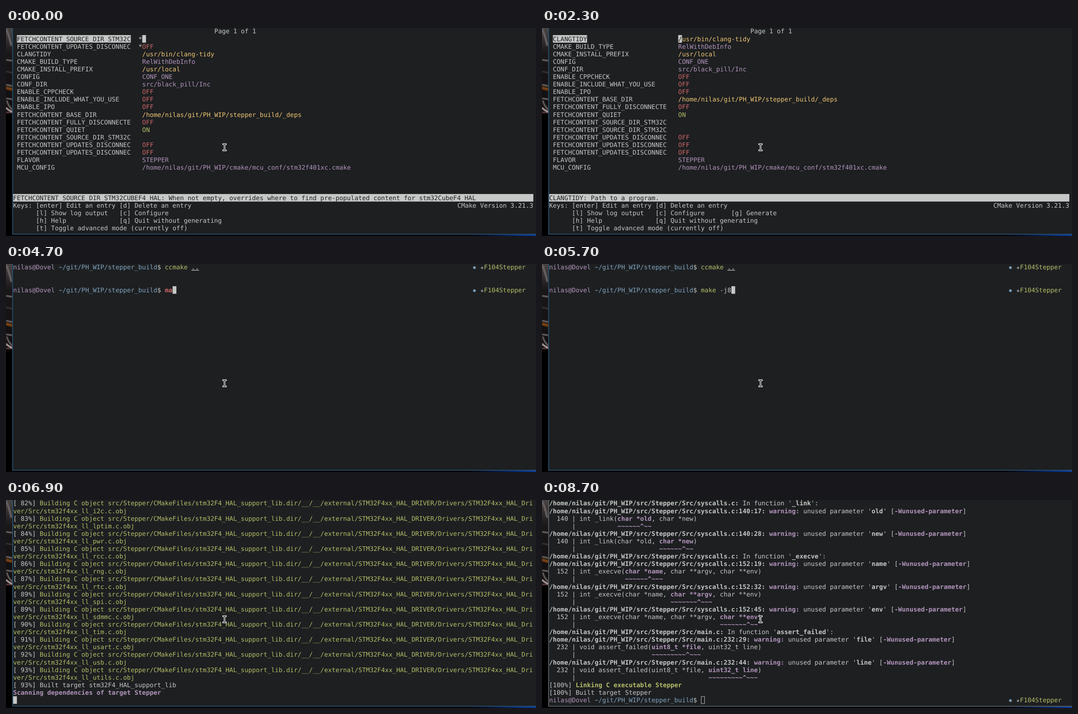
An HTML page that plays this animation: 1192 px wide and 470 px high, repeating every 9300 ms.

```html
<!DOCTYPE html>
<html lang="en">
<head>
<meta charset="utf-8">
<title>Terminal build</title>
<style>
html, body { margin: 0; width: 100%; height: 100%; overflow: hidden; background: #000; }
svg { display: block; width: 100%; height: 100%; }
text { font: 14.185px "DejaVu Sans Mono", monospace; white-space: pre; fill: #c5c8c6; text-rendering: geometricPrecision; }
.r, .R { fill: #cc6666; }
.g, .G { fill: #b5bd68; }
.y { fill: #f0c674; }
.p, .P { fill: #b294bb; }
.b, .S { fill: #81a2be; }
.k { fill: #1d1f21; }
.u { text-decoration: underline; }
.B, .P, .G, .R, .S { font-weight: bold; }
</style>
</head>
<body>
<svg viewBox="0 0 1192 470">
  <defs>
    <linearGradient id="glow">
      <stop offset="0" stop-color="#000"/>
      <stop offset="1" stop-color="#0a3c9e"/>
    </linearGradient>
    <linearGradient id="dusk" x2="0" y2="1">
      <stop offset="0" stop-color="#4a4445"/>
      <stop offset=".3" stop-color="#1a1718"/>
      <stop offset="1" stop-color="#120e0f"/>
    </linearGradient>
    <filter id="soft" x="-20%" y="-20%" width="140%" height="140%"><feGaussianBlur stdDeviation="0.8"/></filter>
    <clipPath id="strip"><rect width="14" height="193"/></clipPath>
    <path id="beam" d="M488.500 262.500H490.500L491.500 263.500L492.500 262.500H494.500M491.500 263.500V275.500M488.500 276.500H490.500L491.500 275.500L492.500 276.500H494.500" fill="none" stroke-linecap="square"/>
  </defs>
  <rect width="1192" height="470"/>
  <g clip-path="url(#strip)">
    <rect width="14" height="193" fill="url(#dusk)"/>
    <g filter="url(#soft)" fill="none" stroke="#a39c9d" stroke-width="2">
      <path d="M0 2Q7 16 12 40" stroke="#6d6667" stroke-width="4"/>
      <path d="M0 72L14 74"/>
      <path d="M0 98L14 101" stroke="#4d4748"/>
      <path d="M0 128L14 131"/>
      <path d="M0 135L14 139" stroke="#7a430f" stroke-width="6"/>
      <path d="M0 159L14 161"/>
      <path d="M2 164Q5 177 14 184"/>
      <path d="M0 180Q5 186 14 189" stroke="#d8c4c4" stroke-width="3"/>
      <path d="M0 191H14" stroke="#8a5557" stroke-width="2"/>
    </g>
  </g>
  <rect x="1040" y="467" width="152" height="3" fill="url(#glow)"/>
  <rect id="frame" x="14" width="1178" height="467"/>
  <rect x="15.7" width="1176.3" height="465.3" fill="#1d1f21"/>
  <g id="screen"></g>
  <use href="#beam" stroke="#fff" stroke-width="3.4"/>
  <use href="#beam" stroke="#000" stroke-width="1.1"/>
</svg>
<script>
const LOOP = 9300, CW = 8.54, RH = 17.1, LEFT = 16, TOP = -1.1, COLS = 137, LAST = 26;
const screen = document.getElementById("screen");
const frame = document.getElementById("frame");
const USER = "nilas", HOST = "Dovel", HOME = `/home/${USER}/git/PH_WIP`;

const x = col => (LEFT + col * CW).toFixed(2);
const y = row => (TOP + row * RH).toFixed(2);

// Inline markup: {c:text} sets class c.
const style = s => s.replace(/\{(\w):([^}]*)\}/g, '<tspan class="$1">$2</tspan>');
const put = (row, col, s) => `<text x="${x(col)}" y="${(TOP + row * RH + 13.5).toFixed(2)}">${style(s)}</text>`;
const bar = (row, col, n) => `<rect x="${x(col)}" y="${y(row)}" width="${(n * CW).toFixed(2)}" height="${RH}" fill="#c5c8c6"/>`;
const cursor = (row, col) => bar(row, col, 1);
const hollow = (row, col) =>
  `<rect x="${+x(col) + .5}" y="${+y(row) + .5}" width="${CW - 1}" height="${RH - 1}" fill="none" stroke="#c5c8c6"/>`;
const version = row => put(row, 117, "CMake Version 3.21.3");

// ---- ccmake pages ----
const SOURCE = "FETCHCONTENT_SOURCE_DIR_STM32C", UPDATES = "FETCHCONTENT_UPDATES_DISCONNEC";
const OFF = "{r:OFF}";
const head = [
  ["CLANGTIDY", "{y:/usr/bin/clang-tidy}"],
  ["CMAKE_BUILD_TYPE", "{p:RelWithDebInfo}"],
  ["CMAKE_INSTALL_PREFIX", "{y:/usr/local}"],
  ["CONFIG", "{p:CONF_ONE}"],
  ["CONF_DIR", "{p:src/black_pill/Inc}"],
  ["ENABLE_CPPCHECK", OFF],
  ["ENABLE_INCLUDE_WHAT_YOU_USE", OFF],
  ["ENABLE_IPO", OFF],
  ["FETCHCONTENT_BASE_DIR", `{y:${HOME}/stepper_build/_deps}`],
  ["FETCHCONTENT_FULLY_DISCONNECTE", OFF],
  ["FETCHCONTENT_QUIET", "{g:ON}"],
  [SOURCE, ""]
];
const tail = [
  [UPDATES, OFF],
  [UPDATES, OFF],
  ["FLAVOR", "{p:STEPPER}"],
  ["MCU_CONFIG", `{p:${HOME}/cmake/mcu_conf/stm32f401xc.cmake}`]
];
const before = [[SOURCE, "", "*"], [UPDATES, OFF, "*"], ...head, ...tail];
const after = [...head, [SOURCE, ""], [UPDATES, OFF], ...tail];

function page(entries, help, generate) {
  let out = put(0, 53, "Page 1 of 1") + bar(1, 1, entries[0][0].length) + cursor(1, 34);
  entries.forEach(([name, value, mark], i) => {
    const first = i === 0;
    out += put(i + 1, 1, first ? `{k:${name}}` : name);
    if (mark) out += put(i + 1, 33, mark);
    out += put(i + 1, 34, value);
    if (first && value) out += put(1, 34, "{k:/}");
  });
  return out + bar(22, 0, COLS) + put(22, 0, `{k:${help}}`) +
    put(23, 0, "Keys: [enter] Edit an entry [d] Delete an entry") + version(23) +
    put(24, 6, "[l] Show log output   [c] Configure" + (generate ? "       [g] Generate" : "")) +
    put(25, 6, "[h] Help              [q] Quit without generating") +
    put(26, 6, "[t] Toggle advanced mode (currently off)");
}

function configuring() {
  const conf = `${HOME}/cmake/mcu_conf`;
  const rows = [
    "Now m4 conf src/black_pill/Inc",
    "Configure files to use:",
    `${conf}/stm32f103xb.cmake;${conf}/stm32f401xc.cmake;${HOME}/`,
    "cmake/mcu_conf/stm32f411xe.cmake",
    "Using /usr/bin/arm-none-eabi-g++ /usr/bin/arm-none-eabi-gcc RelWithDebInfo",
    "FPU supported",
    "No colored compiler diagnostic set for '' compiler.",
    "Using Conf One"
  ];
  return rows.map((s, i) => put(i + 1, 1, s)).join("") + cursor(8, 15) + bar(23, 0, COLS) +
    put(23, 0, `{k:100% [${"#".repeat(40)}] Configuring...}`) + version(24);
}

// ---- shell ----
const prompt = (row, cmd) =>
  put(row, 0, `{p:${USER}@${HOST}} {b:~/git/PH_WIP/stepper_build}$ ${cmd}`) +
  put(row, 121, "{S:✹}") + put(row, 123, "✭") + put(row, 124, "{g:F104Stepper}");

const keyTimes = [4600, 4700, 4800, 4900, 5000, 5200, 5500, 5700];
const command = "make -j8";

function shell(n) {
  const word = command.slice(0, Math.min(n, 4));
  const cmd = n ? `{${n < 4 ? "R" : "g"}:${word}}${command.slice(4, n)}` : "";
  return prompt(0, "{g:ccmake} {u:..}") + prompt(3, cmd);
}

// ---- build log ----
const withPrefix = (prefix, names) => names.split(" ").map(n => prefix + n);
const hal = [
  ...withPrefix("hal", " _msp_template _timebase_rtc_alarm_template _timebase_rtc_wakeup_template " +
    "_timebase_tim_template _adc_ex").slice(1),
  "hal",
  ...withPrefix("hal_", "can cryp adc cec crc cortex cryp_ex dac dac_ex dcmi dcmi_ex dfsdm dma dma2d dma_ex dsi eth " +
    "exti flash flash_ex flash_ramfunc fmpi2c fmpi2c_ex fmpsmbus fmpsmbus_ex gpio hash hash_ex hcd i2c i2c_ex " +
    "i2s i2s_ex irda iwdg lptim ltdc ltdc_ex mmc nand nor pccard pcd pcd_ex pwr pwr_ex qspi rcc rcc_ex rng rtc " +
    "rtc_ex sai sai_ex sd sdram smartcard smbus spdifrx spi sram tim tim_ex uart usart wwdg"),
  ...withPrefix("ll_", "adc crc dac dma dma2d exti fmc fmpi2c fsmc gpio i2c lptim pwr rcc rng rtc spi sdmmc tim " +
    "usart usb utils")
];

// Parallel jobs make the counter skip and repeat here and there.
const percent = i => i < 6 || i === 12 || i === 88 ? i + 1 : i;
const tag = n => `[${String(n).padStart(3)}%] `;

const libRows = hal.flatMap((name, i) => [
  tag(percent(i)) + "{g:Building C object src/Stepper/CMakeFiles/stm32F4_HAL_support_lib.dir/__/__/" +
    "external/STM32F4xx_HAL_DRIVER/Drivers/STM32F4xx_HAL_Dri}",
  `{g:ver/Src/stm32f4xx_${name}.c.obj}`
]);
const scan = name => `{P:Scanning dependencies of target ${name}}`;
const libDone = [tag(93) + "Built target stm32F4_HAL_support_lib", scan("Stepper")];
const appRows = "main stm32f4xx_it stm32f4xx_hal_msp syscalls sysmem system_stm32f4xx".split(" ")
  .map((n, i) => `${tag(94 + i)}{g:Building C object src/Stepper/CMakeFiles/Stepper.dir/Src/${n}.c.obj}`);

const inFile = (file, fn) => `{B:${HOME}/src/Stepper/Src/${file}:} In function '{B:${fn}}':`;

function warning(file, line, code, arg) {
  const at = code.indexOf(arg), nameAt = arg.search(/\w+$/), name = arg.slice(nameAt);
  const col = at + nameAt + 1;
  return [
    `{B:${HOME}/src/Stepper/Src/${file}:${line}:${col}:} {P:warning:} unused parameter '{B:${name}}' [{P:-Wunused-parameter}]`,
    `  ${line} | ${code.replace(arg, `{P:${arg}}`)}`,
    `      | ${" ".repeat(at)}{P:${"~".repeat(nameAt)}^${"~".repeat(name.length - 1)}}`
  ];
}
const warnings = (file, fn, line, code, args) =>
  [inFile(file, fn), ...args.flatMap(a => warning(file, line, code, a))];

const sysWarnings = [
  ...warnings("syscalls.c", "_link", 140, "int _link(char *old, char *new)", ["char *old", "char *new"]),
  ...warnings("syscalls.c", "_execve", 152, "int _execve(char *name, char **argv, char **env)",
    ["char *name", "char **argv", "char **env"])
];
const mainWarnings = warnings("main.c", "assert_failed", 232,
  "void assert_failed(uint8_t *file, uint32_t line)", ["uint8_t *file", "uint32_t line"]);
const linked = ["[100%] {G:Linking C executable Stepper}", "[100%] Built target Stepper"];

const rowsAt = rows => rows.slice(-LAST).map((s, i) => put(i, 0, s)).join("");
const libUpTo = i => libRows.slice(0, 2 * (i + 1));

function build(t) {
  const step = Math.floor((t - 6200) / 100);
  if (step < 2) {
    const rows = step < 1 ? [] : [scan("stm32F4_HAL_support_lib"), ...libUpTo(4)];
    return shell(8) + rows.map((s, i) => put(4 + i, 0, s)).join("") + cursor(4 + rows.length, 0);
  }
  let rows;
  if (step < 7) rows = libUpTo(Math.round(17 + (step - 2) * 15.2));
  else {
    rows = [...libRows, ...libDone];
    if (step > 7) rows.push(...appRows.slice(0, step > 8 ? 6 : 3));
    if (t >= 8500) rows.push(...sysWarnings);
  }
  return rowsAt(rows) + cursor(LAST, 0);
}

const finished = mark => rowsAt([...sysWarnings, ...mainWarnings, ...linked]) + prompt(LAST, "") + mark(LAST, 40);

function picture(t) {
  if (t < 2100) return page(before,
    "FETCHCONTENT_SOURCE_DIR_STM32CUBEF4_HAL: When not empty, overrides where to find pre-populated content for stm32CubeF4_HAL");
  if (t < 2300) return configuring();
  if (t < 3600) return page(after, "CLANGTIDY: Path to a program.", true);
  if (t < 6200) {
    const n = keyTimes.filter(k => k <= t).length;
    return shell(n) + cursor(3, 40 + n);
  }
  if (t < 8600) return build(t);
  return finished(t < 8700 ? cursor : hollow);
}

let shown = -1;
function draw(now) {
  const t = Math.floor((now % LOOP) / 100) * 100;
  if (t !== shown) {
    shown = t;
    screen.innerHTML = picture(t);
    frame.setAttribute("fill", t < 8700 ? "#285577" : "#5f676a");
  }
}
const start = performance.now();
function tick() {
  draw(performance.now() - start);
  requestAnimationFrame(tick);
}
tick();
</script>
</body>
</html>
```
